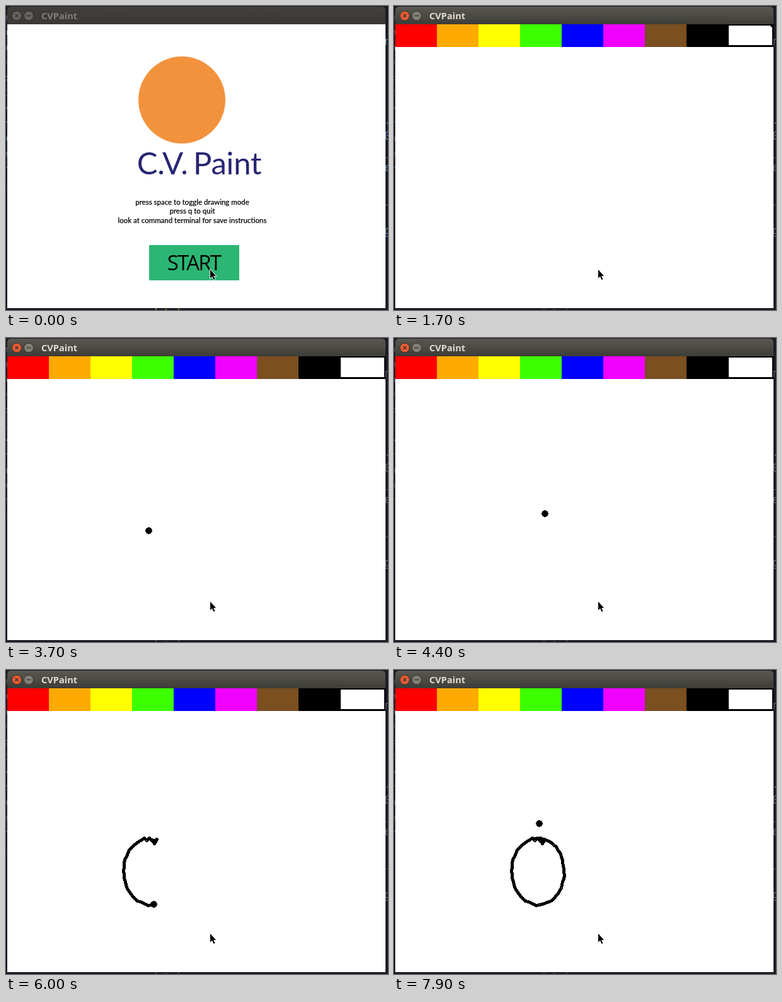
Write an HTML page that moves like this. It is 606x482 px and loops after 8000 ms.

```html
<!DOCTYPE html>
<html lang="en">
<head>
<meta charset="utf-8">
<title>CVPaint</title>
<style>
  html, body { margin: 0; width: 100%; height: 100%; overflow: hidden; background: #191b25; }
  svg { display: block; width: 606px; height: 482px; }
  .edge { font: 18px "DejaVu Sans Mono", monospace; }
  .edge.small { font-size: 12px; }
  .title { font: bold 14.6px "Open Sans", "Noto Sans", sans-serif; }
  .name { font: 49px Lato, sans-serif; letter-spacing: -.2px; word-spacing: -4px; fill: #262673; }
  .hint { font: 11.5px Lato, sans-serif; stroke: #000; stroke-width: .25px; }
  .start { font: 33px "Open Sans", "Noto Sans", sans-serif; letter-spacing: -1.8px; }
  .mid { text-anchor: middle; }
  .crisp { shape-rendering: crispEdges; }
</style>
</head>
<body>
<svg viewBox="0 0 606 482">
  <defs>
    <linearGradient id="active" x2="0" y2="1">
      <stop offset="0" stop-color="#5a5850"/>
      <stop offset="1" stop-color="#3d3c37"/>
    </linearGradient>
    <linearGradient id="idle" x2="0" y2="1">
      <stop offset="0" stop-color="#403f3b"/>
      <stop offset="1" stop-color="#3a3935"/>
    </linearGradient>
  </defs>
  <rect width="606" height="482" fill="#191b25"/>
  <g id="edges"></g>
  <path id="marks" d="M237 479h2v3h-2zM253 480h2v2h-2zM273 479h2v3h-2z"/>

  <path id="bar" d="M2 29V7Q2 1 8 1H596Q602 1 602 7V29Z"/>
  <circle id="close" cx="17" cy="15.5" r="7.5" stroke="#302f2b"/>
  <path d="M14.5 13l5 5m0-5l-5 5" stroke="#35322d" stroke-width="1.3"/>
  <circle id="min" cx="36" cy="15.5" r="7.5" stroke="#302f2b"/>
  <path d="M32.5 15.5h7" stroke="#35322d" stroke-width="1.3"/>
  <text id="title" class="title" x="56" y="21">CVPaint</text>
  <rect class="crisp" x="2" y="29" width="600" height="450" fill="#fff"/>

  <g id="splash">
    <circle cx="279" cy="149" r="69" fill="#f3923c"/>
    <text class="name mid" x="306.5" y="267">C.V. Paint</text>
    <g class="hint mid">
      <text x="295.5" y="315">press space to toggle drawing mode</text>
      <text x="295.5" y="329">press q to quit</text>
      <text x="295.5" y="344">look at command terminal for save instructions</text>
    </g>
    <rect class="crisp" x="227" y="379" width="143" height="56" fill="#2cb673"/>
    <text class="start mid" x="298" y="419">START</text>
  </g>

  <g id="canvas" class="crisp">
    <g id="swatches"></g>
    <rect x="531" y="31" width="69" height="31" fill="#fff"/>
    <path id="corner" d="M597 31h3v3h-1v-1h-1v-1h-1z"/>
    <polyline id="line" fill="none" stroke="#000" stroke-width="5" stroke-linejoin="round" stroke-linecap="round"/>
    <circle id="dot" r="5.3"/>
  </g>

  <path d="M324 418v13.5l3-2.8 2.4 5.2 2.1-1-2.4-5h4z" stroke="#fff" stroke-width="1.6" paint-order="stroke"/>
</svg>
<script>
const LOOP = 8000, STEP = 100;
const FOCUS = 1400, OPEN = 1700, CORNER_OFF = 2800;
const ENTER = 31, HOVER = 40, DRAW = 48, OVAL = 51, LIFT = 71;   // in steps
const PER_STEP = 3;   // line vertices per step

const $ = id => document.getElementById(id);

function noise(i) {
  const v = Math.sin(i * 12.9898) * 43758.5453;
  return v - Math.floor(v) - .5;
}

// Shaky oval, drawn counterclockwise from the top; k is in steps
function oval(k) {
  const a = (18 + 17.6 * k + 12 * Math.sin(Math.PI * k / 20)) * Math.PI / 180;
  const wobble = 1.6 * noise(k * PER_STEP + 5);
  return [228 - (41.5 + wobble) * Math.sin(a), 319 - (53 + wobble) * Math.cos(a)];
}

// A knot, a short zigzag, then the oval
const knot = [[235, 275], [239, 268], [235, 270], [231, 269], [235, 274]];
const trace = [...knot];
for (let i = 0; i < 4; i++) trace.push([231 - 4 * i, i % 2 ? 266 : 270]);
for (let i = 0; i <= (LIFT - OVAL) * PER_STEP; i++) trace.push(oval(i / PER_STEP));

function dotAt(n) {
  if (n < HOVER) {
    const u = (n - ENTER) / 8;
    return [193 + 50 * u ** 1.45, 282 + 192 * (1 - u) ** 1.53];
  }
  if (n < DRAW) {
    const k = n - HOVER;
    return [243 - k + 2 * noise(n), 280 - k / 2 + 3 * noise(n + 9)];
  }
  if (n <= LIFT) return trace[PER_STEP * (n - DRAW)];
  const u = (n - LIFT) / 4;
  return [229.5 - 6 * Math.sin(Math.PI * Math.min(u, 1)), 270 - 27 * Math.max(u - 1, 0)];
}

const pixel = p => p.map(v => Math.round(v) + .5);

const colors = ['#f00', '#ffaa00', '#ff0', '#3cff00', '#00f', '#f000ff', '#7b4f20', '#000', '#000'];
$('swatches').innerHTML = colors.map((c, i) =>
  `<rect x="${2 + 66 * i}" y="29" width="${i === 8 ? 72 : 66}" height="36" fill="${c}"/>`).join('');

const column = (chars, cls, x, y, gap) => [...chars].map((c, i) =>
  `<text class="${cls}" x="${x}" y="${y + gap * i}">${c}</text>`).join('');
$('edges').innerHTML = column('eno)c(>rner.', 'edge small', -4, 22, 24) +
  column('n    .0_e _ g', 'edge', 600, 62, 25);

function show(id, on) {
  $(id).style.display = on ? '' : 'none';
}

function fill(id, color) {
  $(id).setAttribute('fill', color);
}

function render(t) {
  const n = Math.floor(t / STEP);
  const focused = t >= FOCUS;
  fill('bar', focused ? 'url(#active)' : 'url(#idle)');
  fill('close', focused ? '#ea5b33' : '#65635d');
  fill('min', focused ? '#827f76' : '#65635d');
  fill('title', focused ? '#dfdbd2' : '#817e77');
  fill('edges', focused ? '#5f6470' : '#67809f');
  fill('marks', focused ? '#3b3d45' : '#a0652c');

  show('splash', t < OPEN);
  show('canvas', t >= OPEN);
  show('corner', t < CORNER_OFF);
  show('dot', n >= ENTER);
  show('line', n > DRAW);
  if (n >= ENTER) {
    const [x, y] = pixel(dotAt(n));
    $('dot').setAttribute('cx', x);
    $('dot').setAttribute('cy', y);
  }
  if (n > DRAW) {
    const drawn = trace.slice(0, PER_STEP * (Math.min(n, LIFT) - DRAW) + 1);
    $('line').setAttribute('points', drawn.map(pixel).join(' '));
  }
}

const begin = performance.now();
function tick() {
  render((performance.now() - begin) % LOOP);
  requestAnimationFrame(tick);
}
tick();
</script>
</body>
</html>
```
